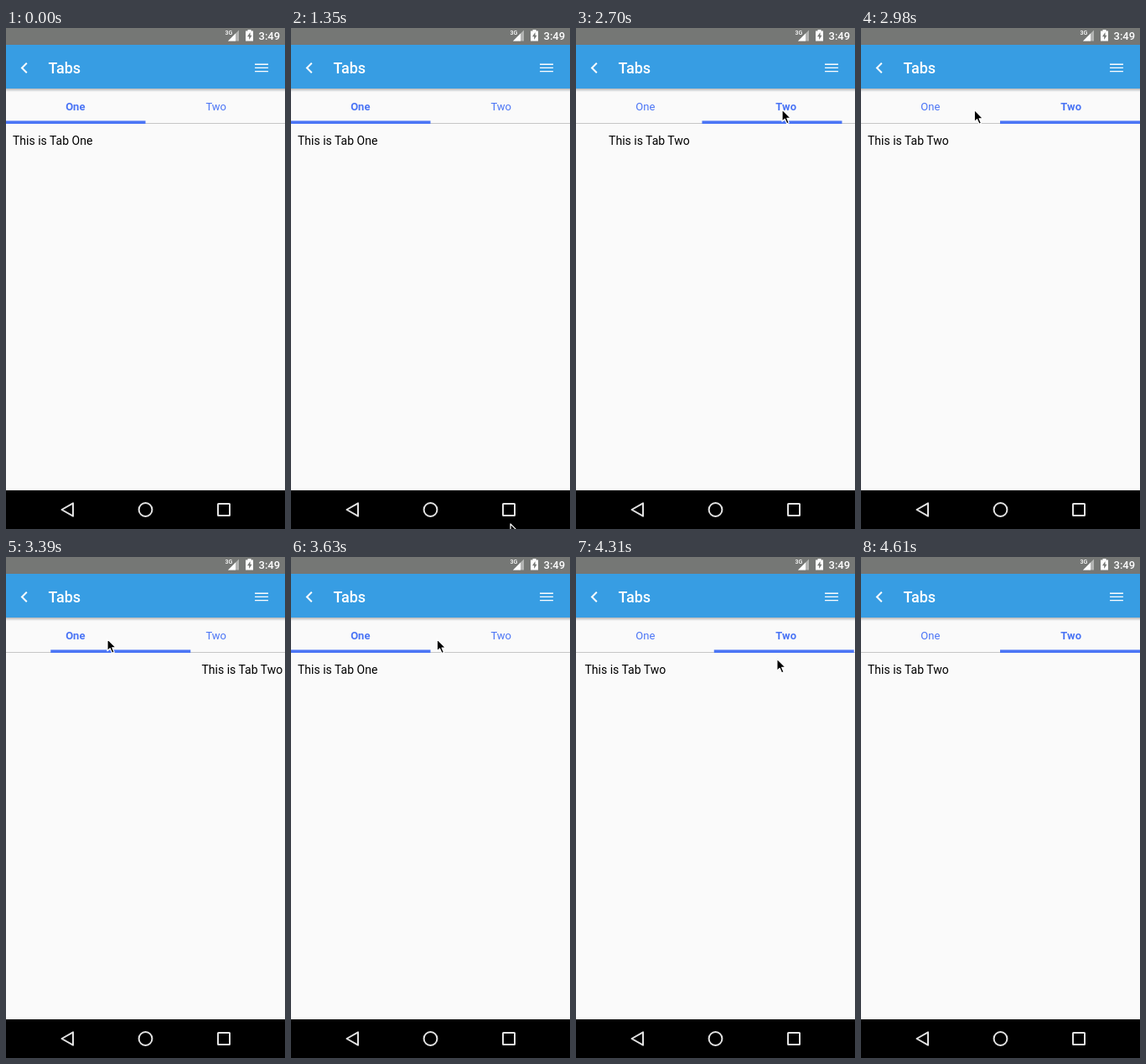
Recreate the animation shown at these times as an HTML page. Size 333 by 596 pixels, loop 4.9 s.

```html
<!DOCTYPE html>
<html lang="en">
<head>
<meta charset="utf-8">
<title>Tabs</title>
<style>
  html, body { margin: 0; width: 100%; height: 100%; overflow: hidden; background: #fafafa; }
  svg { display: block; width: 100%; height: 100%; font-family: Roboto, sans-serif; }
  .tab { font-size: 13px; fill: #4b75f5; text-anchor: middle; }
  .page { font-size: 14px; fill: #000; }
  .line { fill: none; stroke: #fff; stroke-width: 2; }
</style>
</head>
<body>
<svg viewBox="0 0 333 596">
  <defs>
    <linearGradient id="shade" x2="0" y2="1">
      <stop stop-color="#000" stop-opacity=".27"/>
      <stop offset="1" stop-color="#000" stop-opacity="0"/>
    </linearGradient>
  </defs>
  <rect width="333" height="596" fill="#fafafa"/>

  <!-- Status bar -->
  <rect width="333" height="20" fill="#757775"/>
  <text x="261.5" y="8" font-size="7" font-weight="500" fill="#fff">3G</text>
  <path d="M278 2.5V15.5H265Z" fill="#fff" opacity=".45"/>
  <path d="M274 6.5V15.5H265Z" fill="#fff"/>
  <path d="M288.5 2H292.5V3.5H295V15.5H286V3.5H288.5Z" fill="#fff"/>
  <path d="M291.5 5L288 10.3H290.2V14L293.5 8.7H291.5Z" fill="#757775"/>
  <text x="301.5" y="14" font-size="13" font-weight="500" fill="#fff">3:49</text>

  <!-- Toolbar -->
  <rect y="20" width="333" height="52" fill="#379de3"/>
  <path class="line" d="M24.8 41.8L19 47.5L24.8 53.2"/>
  <text x="50.5" y="54" font-size="18" font-weight="500" fill="#fff">Tabs</text>
  <path class="line" d="M297 43.2H313M297 47.4H313M297 51.6H313" style="stroke-width:1.4"/>
  <rect y="72" width="333" height="4" fill="url(#shade)"/>

  <!-- Tab bar -->
  <text class="tab" x="82.8" y="98">One</text>
  <text class="tab" x="250.7" y="98">Two</text>
  <rect id="press" y="72" width="166.5" height="41" fill="#bebebe" opacity=".2"/>
  <rect y="113" width="333" height="1" fill="#c6c6c6"/>
  <rect id="indicator" y="110.4" width="167" height="3.6" fill="#4b75f5"/>

  <!-- Pages -->
  <g id="pages">
    <text class="page" x="8" y="138.5">This is Tab One</text>
    <text class="page" x="341" y="138.5">This is Tab Two</text>
  </g>

  <!-- Navigation bar -->
  <rect y="550" width="333" height="46"/>
  <g class="line" style="stroke:#e2e2e2">
    <path d="M66.5 573L80 565.3V580.7Z" stroke-linejoin="round"/>
    <circle cx="166.5" cy="573" r="7.9"/>
    <rect x="253" y="566" width="14" height="14" rx=".5"/>
  </g>

  <path id="cursor" d="M0 0V14.2L3.2 11.2L5.7 16.8L8.2 15.7L5.8 10.3H10.3Z"
        stroke="#fff" stroke-width="1.2" stroke-linejoin="round"/>
</svg>
<script>
const LOOP = 4900, SLIDE = 300, PRESS = 65;
const TAB = 166.5, PAGE = 333;
const [press, indicator, pages, cursor] =
  ["press", "indicator", "pages", "cursor"].map(id => document.getElementById(id));
const tabs = document.querySelectorAll(".tab");

const taps = [
  { at: 2514, tab: 1 },
  { at: 3272, tab: 0 },
  { at: 4049, tab: 1 }
];

const linear = u => u;
const smooth = u => u * u * (3 - 2 * u);

// Pointer path: each stop is reached at its time with its easing.
const stops = [
  { at: 1350, x: 262, y: 590 },
  { at: 1470, x: 255, y: 500, ease: u => u * u },
  { at: 1680, x: 241, y: 215, ease: linear },
  { at: 1850, x: 240, y: 131, ease: u => u * (2 - u) },
  { at: 1880, x: 240, y: 131, ease: linear },
  { at: 2010, x: 246, y: 97, ease: smooth },
  { at: 2760, x: 246, y: 97, ease: linear },
  { at: 3040, x: 121, y: 97.5, ease: smooth },
  { at: 3500, x: 121, y: 97.5, ease: linear },
  { at: 3780, x: 239, y: 98, ease: smooth },
  { at: 4270, x: 239, y: 98, ease: linear },
  { at: 4550, x: 258, y: 598, ease: u => u ** 1.6 }
];

const mix = (a, b, u) => a + (b - a) * u;
const clamp = u => Math.min(1, Math.max(0, u));
const bezier = (a, b, s) => 3 * a * s * (1 - s) ** 2 + 3 * b * s * s * (1 - s) + s ** 3;

// cubic-bezier(.4, .7, .5, 1)
function slideEase(u) {
  if (u <= 0 || u >= 1) return clamp(u);
  let low = 0, high = 1;
  for (let i = 0; i < 20; i++) {
    const mid = (low + high) / 2;
    if (bezier(.4, .5, mid) < u) low = mid; else high = mid;
  }
  return bezier(.7, 1, low);
}

function drawTabs(t) {
  const tap = taps.filter(tap => t >= tap.at).pop();
  const active = tap ? tap.tab : 0;
  const progress = tap ? slideEase((t - tap.at) / SLIDE) : 1;
  const position = mix(1 - active, active, progress);
  tabs.forEach((tab, i) => tab.setAttribute("font-weight", i === active ? 700 : 400));
  indicator.setAttribute("x", position * TAB - .5);
  pages.setAttribute("transform", `translate(${-position * PAGE})`);
  press.setAttribute("x", active * TAB);
  press.setAttribute("visibility", tap && t - tap.at < PRESS ? "visible" : "hidden");
}

function drawCursor(t) {
  const next = stops.findIndex(stop => stop.at > t);
  cursor.setAttribute("visibility", next > 0 ? "visible" : "hidden");
  if (next < 1) return;
  const from = stops[next - 1], to = stops[next];
  const u = to.ease((t - from.at) / (to.at - from.at));
  cursor.setAttribute("transform", `translate(${mix(from.x, to.x, u)} ${mix(from.y, to.y, u)})`);
}

const start = performance.now();
function frame() {
  const t = (performance.now() - start) % LOOP;
  drawTabs(t);
  drawCursor(t);
  requestAnimationFrame(frame);
}
frame();
</script>
</body>
</html>
```
